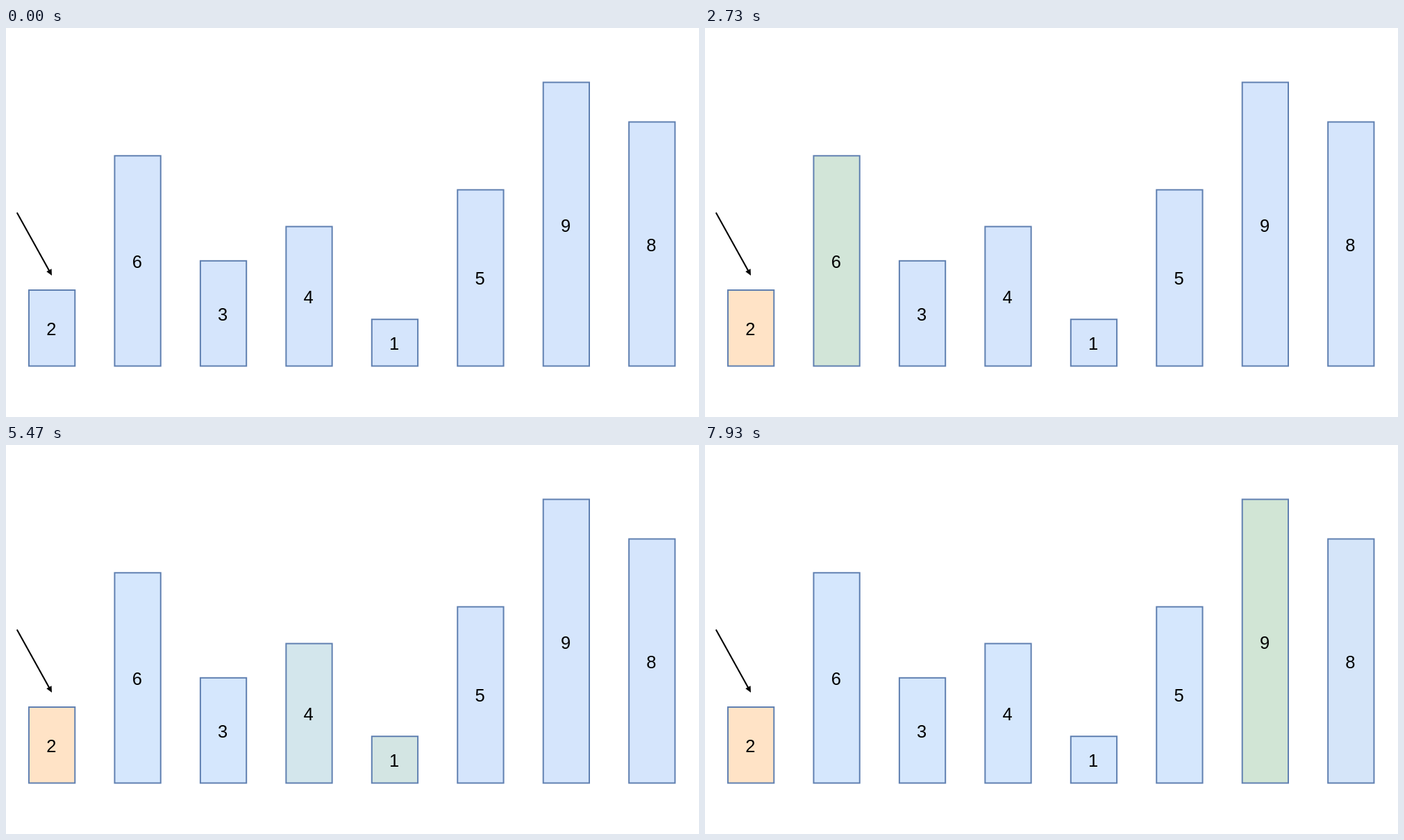
An HTML page for the animation above (8000 ms loop, 998 by 561 pixels).

```html
<!DOCTYPE html>
<html lang="en">
<head>
<meta charset="utf-8">
<title>Scanning bars</title>
<style>
  html, body { margin: 0; width: 100%; height: 100%; overflow: hidden; background: #fff; }
  svg { display: block; width: 998px; height: 561px; }
  rect { stroke: #6080b1; stroke-width: 2; }
  text { font: 25.5px "Liberation Sans", Arial, sans-serif; text-anchor: middle; fill: #000; }
</style>
</head>
<body>
<svg viewBox="0 0 998 561">
  <g id="bars"></g>
  <path d="M15.8 266.2 L62.5 350.5" stroke="#000" stroke-width="2.1" fill="none"/>
  <path d="M66 357 L58.3 351.2 L65.6 347.2 Z" fill="#000"/>
</svg>
<script>
const LOOP = 8000, FIRST = 870, STEP = 1000;
const BLUE = [213, 229, 252], REST = [213, 231, 253];
const GREEN = [209, 229, 210], ORANGE = [255, 227, 198];
const BOTTOM = 487.5, PITCH = 123.45, WIDTH = 66.3;

// value, top edge, text centre
const data = [
  [2, 378, 433.5], [6, 184.3, 336.5], [3, 335.8, 412.5], [4, 286.4, 388],
  [1, 420.2, 455.3], [5, 233.4, 361], [9, 78.4, 284.5], [8, 135.5, 313]
];

const root = document.getElementById('bars');

function add(tag, attrs) {
  const el = document.createElementNS('http://www.w3.org/2000/svg', tag);
  for (const key in attrs) el.setAttribute(key, attrs[key]);
  return root.appendChild(el);
}

const bars = data.map(([value, top, mid], i) => {
  const x = 33 + i * PITCH;
  const bar = add('rect', { x, y: top, width: WIDTH, height: BOTTOM - top });
  add('text', { x: x + 32.3, y: mid + 9 }).textContent = value;
  return bar;
});

const clamp = v => Math.min(1, Math.max(0, v));
const mix = (a, b, p) => a.map((v, i) => v + (b[i] - v) * p);

// Each bar fades in for one step; all but the first fade out in the next.
function color(i, t) {
  const p = (t - FIRST) / STEP - i;
  if (i === 0) return mix(BLUE, ORANGE, clamp(p));
  return p < 1 ? mix(BLUE, GREEN, clamp(p)) : mix(GREEN, REST, clamp(p - 1));
}

function draw(now) {
  const t = now % LOOP;
  bars.forEach((bar, i) => {
    bar.setAttribute('fill', `rgb(${color(i, t).map(Math.round).join(',')})`);
  });
}

const start = performance.now();
function tick() {
  draw(performance.now() - start);
  requestAnimationFrame(tick);
}
tick();
</script>
</body>
</html>
```
